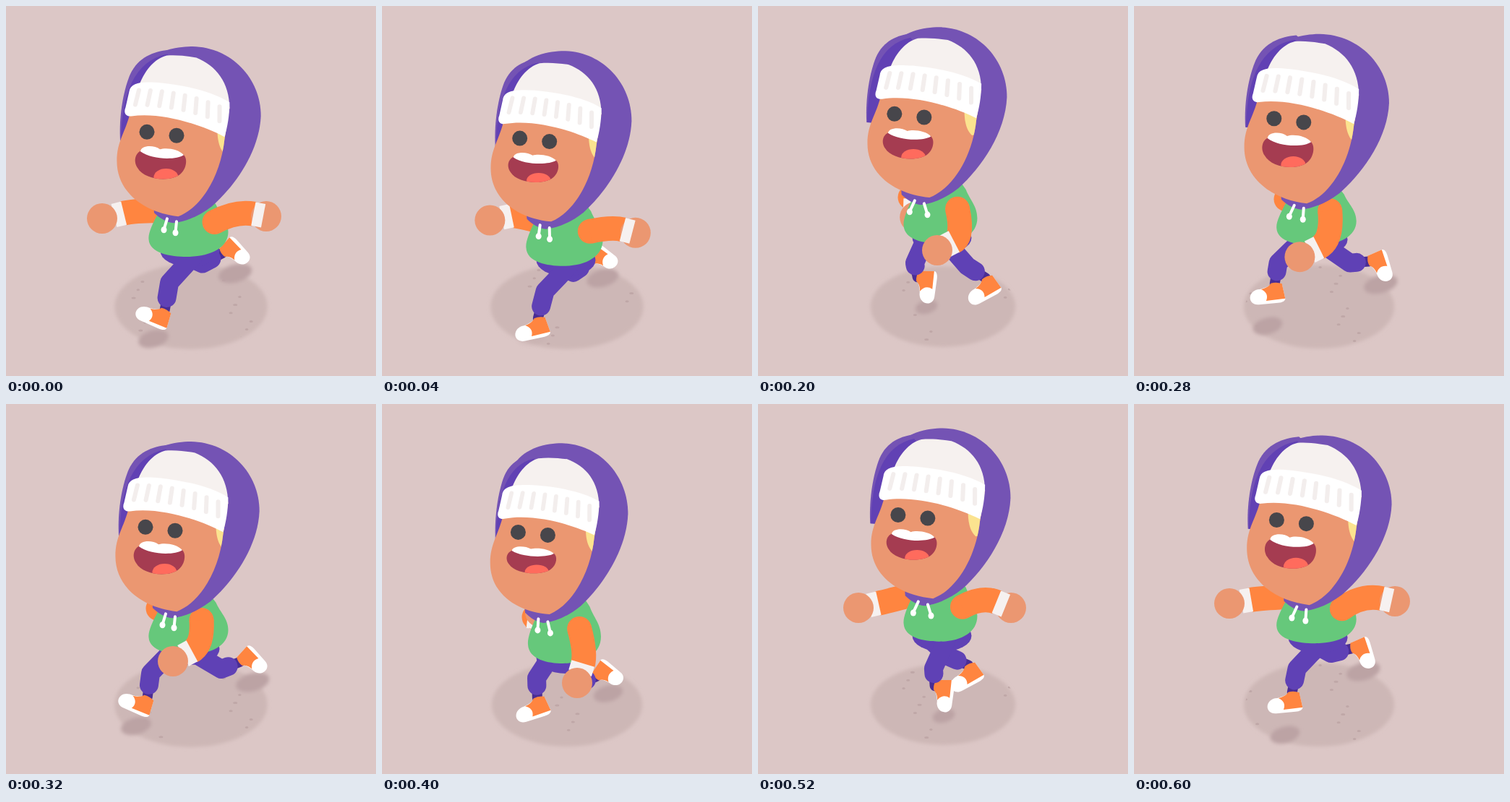
Animation, 512 px wide and 512 px high, one loop 640 ms. Source, as an HTML page:

```html
<!DOCTYPE html>
<html lang="en">
<head>
<meta charset="utf-8">
<title>Running character</title>
<style>
html, body { margin: 0; width: 100%; height: 100%; overflow: hidden; background: #dcc7c6; }
svg { display: block; width: 100%; height: 100%; }
</style>
</head>
<body>
<svg id="stage" viewBox="0 0 512 512"></svg>
<script>
const LOOP = 640, STEP = 40, HALF = LOOP / 2;
const C = {
  ground: '#cdb7b6', speck: '#bfa7a7', shade: '#bca3a4', hood: '#7453b4', inner: '#6141b4',
  pants: '#5f41b5', ankle: '#4a2d93', skin: '#eb9771', shirt: '#66c87b', sleeve: '#ff8540',
  cuff: '#f6f1f0', cap: '#f6f1ef', rib: '#f3eeed', hair: '#fbe38f', eye: '#47464b',
  mouth: '#a53c51', tongue: '#ff6b5d'
};

// Key points of a stride: time, x, y (and angle for the foot)
const FOOT = [
  [0, 204, 429, 24], [40, 208, 448, -12], [200, 312, 394, -28], [300, 343, 356, -122],
  [400, 313, 374, -140], [520, 257, 403, -82], [600, 209, 414, -5]];
const NEAR_HAND = [
  [0, 360, 291], [120, 322, 353], [200, 248, 338], [320, 231, 356], [400, 270, 386], [520, 350, 282], [600, 361, 273]];
const FAR_HAND = [
  [0, 133, 294], [120, 186, 295], [260, 232, 290], [400, 219, 288], [520, 139, 282], [600, 132, 276]];

const mod = (a, n) => ((a % n) + n) % n;
const clamp = a => Math.min(1, Math.max(0, a));
const turns = (t, period) => t / period * 2 * Math.PI;
const wave = (a, mean, cos, sin, sin2 = 0) =>
  mean + cos * Math.cos(a) + sin * Math.sin(a) + sin2 * Math.sin(2 * a);

// Smooth periodic curve through key points
function follow(keys, time) {
  const t = mod(time, LOOP), n = keys.length;
  const key = k => keys[mod(k, n)];
  const when = k => key(k)[0] + LOOP * Math.floor(k / n);
  let i = n - 1;
  while (key(i)[0] > t) i--;
  const span = when(i + 1) - when(i), u = (t - when(i)) / span;
  const slope = (k, c) => (key(k + 1)[c] - key(k - 1)[c]) / (when(k + 1) - when(k - 1)) * span;
  return key(i).slice(1).map((p, j) => {
    const c = j + 1, q = key(i + 1)[c], a = slope(i, c), b = slope(i + 1, c);
    return p + u * (a + u * (3 * (q - p) - 2 * a - b + u * (2 * (p - q) + a + b)));
  });
}

const fill = (d, color, more = '') => `<path d="${d}" fill="${color}" ${more}/>`;
const line = (d, color, width, cap = 'round') =>
  `<path d="${d}" fill="none" stroke="${color}" stroke-width="${width}" stroke-linecap="${cap}" stroke-linejoin="round"/>`;
const oval = (x, y, rx, ry, color, more = '') =>
  `<ellipse cx="${x}" cy="${y}" rx="${rx}" ry="${ry}" fill="${color}" ${more}/>`;
const group = (transform, body) => `<g transform="${transform}">${body}</g>`;

function ground(t) {
  const size = wave(turns(t - 20, HALF), 103, 3, 0);
  let specks = '';
  for (let i = 1; i <= 25; i++) {
    const u = mod(i * .618 + t / HALF, 1) - .5, v = mod(i * .755 + .1, 1) - .5;
    specks += oval(256 + 224 * u + 160 * v, 416 - 128 * u + 100 * v, 2.2 + i % 3 * .4, 1.5, C.speck);
  }
  return oval(256, 416, size, size * .555, C.ground, 'filter="url(#soft)"') +
    `<g clip-path="url(#disc)">${specks}</g>`;
}

// The shadow stays on the ground track and fades in as the foot lifts.
function footShade(t) {
  const [x, footY] = follow(FOOT, t);
  const y = 460 - .55 * (x - 205), r = 15 + Math.abs(x - 262) * .11;
  return oval(x, y, r, r * .35 + 4, C.shade,
    `opacity="${clamp((y - footY - 8) / 15)}" transform="rotate(-15 ${x} ${y})" filter="url(#soft)"`);
}

function leg(t, hipX, hipY) {
  const stride = turns(t, LOOP);
  const [x, y, angle] = follow(FOOT, t);
  const r = angle * Math.PI / 180, cos = Math.cos(r), sin = Math.sin(r);
  const ax = x + 11 * cos + 14 * sin, ay = y + 11 * sin - 14 * cos;
  const kx = (hipX + ax) / 2 + wave(stride, -4, -10, 2);
  const ky = (hipY + ay) / 2 + wave(stride, 8, -8, -3);
  const shin = Math.hypot(ax - kx, ay - ky) || 1, keep = Math.max(.2, 1 - 17 / shin);
  const cx = kx + (ax - kx) * keep, cy = ky + (ay - ky) * keep;
  const shoe =
    fill('M22 -14L25 9C25 13 20 15 14 15L-14 15C-30 15 -30 -6 -14 -9C-4 -9 4 -14 8 -16Z', '#fff') +
    fill('M-9 -9C0 -10 4 -14 6 -17Q14 -19 22 -15L25 9L-3 10C1 2 -2 -5 -9 -9Z', C.sleeve);
  return line(`M${cx} ${cy}L${ax} ${ay}`, C.ankle, 14) +
    group(`translate(${x} ${y}) rotate(${angle}) scale(${.88 + .07 * cos} .87)`, shoe) +
    line(`M${hipX} ${hipY}L${kx} ${ky}L${cx} ${cy}`, C.pants, 26);
}

function arm([sx, sy], [bendX, bendY], [hx, hy], gap, cuffOnTop) {
  const ex = (sx + hx) / 2 + bendX, ey = (sy + hy) / 2 + bendY;
  const reach = Math.hypot(hx - ex, hy - ey) || 1;
  const along = d => `${hx + (hx - ex) / reach * (d - gap)} ${hy + (hy - ey) / reach * (d - gap)}`;
  const hand = oval(hx, hy, 21, 21, C.skin);
  const cuff = line(`M${along(-7)}L${along(7)}`, C.cuff, 33, 'butt');
  return oval(sx, sy, 17, 17, C.sleeve) + line(`M${sx} ${sy}Q${ex} ${ey} ${along(-6)}`, C.sleeve, 34, 'butt') +
    (cuffOnTop ? hand + cuff : cuff + hand);
}

function torso(x, bottom, width, turn) {
  return group(`translate(${x} ${bottom}) scale(${width / 110} ${1 + .1 * turn})`,
    fill('M-42 -60C-50 -45 -56 -32 -55 -24C-54 -5 -25 0 -2 0C30 0 55 -12 55 -34C55 -50 44 -58 38 -72L20 -95L-30 -90Z', C.shirt));
}

// Drawn around the left eye; turn narrows the hood, peek slides the face within it.
function head(x, y, turn, peek) {
  const part = (a, b, d, e, f, body) => group(`matrix(${a} ${b} 0 ${d} ${e} ${f}) translate(-195 -174)`, body);
  const face = 'M172 145C165 175 153 186 153 214C153 258 192 286 238 291C272 278 297 232 302 184L309 140Z';
  const mouth = 'M190 199C178 202 176 215 182 224C192 242 230 244 242 232C250 225 252 210 245 205Z';
  const clip = (id, d) => `<clipPath id="${id}"><path d="${d}"/></clipPath>`;
  let ribs = '';
  for (let i = 0; i < 8; i++) {
    const rx = 181 + 16.3 * i, ry = 126 + .47 * i * i, lean = 2.5 - i * .35;
    ribs += line(`M${rx + lean} ${ry - 10}L${rx - lean} ${ry + 10}`, C.rib, 6);
  }
  return group(`translate(${x} ${y})`,
    part(1 - .04 * turn, 0, 1 + .02 * turn, 0, -3 * turn, fill(
      'M190 84C205 62 236 56 258 56C312 57 353 100 353 152C351 200 318 248 285 277C268 290 250 298 232 300C222 299 212 293 205 286Z', C.hood)) +
    part(1 - .2 * turn, 0, 1 - .06 * turn, -1.6 * turn - 4 * peek, 0,
      fill('M158 186C156 150 163 115 172 94C183 70 205 62 226 60L260 90L200 190Z', C.hood) +
      fill('M159 186C160 120 178 75 224 66L245 95L190 186Z', C.inner)) +
    part(1 - .035 * turn + .025 * peek, -.045 * turn, 1 - .03 * turn, 2 * turn + 4.5 * peek, 2 * turn,
      clip('face', face) + fill(face, C.skin) +
      `<g clip-path="url(#face)">${group(`translate(${-3 * turn - 6 * peek} 0)`,
        fill('M293 160C291 188 297 199 303 205L325 200L325 160Z', C.hair))}</g>` +
      fill('M183 112C190 90 205 72 222 68C238 67 250 69 263 71C290 82 309 105 309 142Z', C.cap) +
      fill('M170 118C172 104 190 104 215 106C250 110 285 118 309 133C309 150 306 168 302 181C270 164 215 146 173 152C165 153 162 147 165 140Z', '#fff') +
      ribs) +
    oval(0, 0, 10.5, 10.5, C.eye) + oval(41, 5 - turn, 10.5, 10.5, C.eye) +
    part(1 - .03 * turn, 0, 1 - .2 * turn, 0, 4 * turn,
      clip('mouth', mouth) + fill(mouth, C.mouth) +
      oval(221.5, 237, 17, 12, C.tongue, 'clip-path="url(#mouth)"') +
      fill('M186 201C187 192 205 192 213 198C222 195 240 198 246 206C236 213 202 213 186 201Z', '#fff')));
}

function strings(x, y, bob) {
  const cord = (cx, cy, swing) =>
    line(`M${cx} ${cy}L${cx + swing} ${cy + 15}`, '#fff', 4) + oval(cx + swing, cy + 15.5, 4, 4.5, '#fff');
  return cord(x + 28, y + 120, wave(bob, -4.5, 0, 3.5)) + cord(x + 41, y + 124, wave(bob, 2.5, -4, 1));
}

const DEFS = `<defs>
  <filter id="soft" x="-20%" y="-20%" width="140%" height="140%"><feGaussianBlur stdDeviation="2.5"/></filter>
  <clipPath id="disc"><ellipse cx="256" cy="416" rx="102" ry="57"/></clipPath></defs>`;
const FAR = 'translate(-24 -15)';

function scene(t) {
  const bob = turns(t, HALF), stride = turns(t, LOOP);
  const eyeX = wave(bob, 191, 3, -3.5) + wave(stride, 0, 1, -2.3);
  const eyeY = wave(bob, 164.3, 8, 13.5, 2.3) + wave(stride, 0, 2, -1.4);
  const turn = wave(bob, .45, -.4, .5);
  const peek = wave(turns(t - 215, HALF), .5, .5, 0) ** 2;
  const x = 252.5, bottom = wave(bob, 342, 5, 17, 2.3);
  const nearArm = arm([x + wave(stride, 27, 9, 0), bottom - 48], [wave(stride, 8, -14, 10), wave(stride, -3, -9, 10)],
    follow(NEAR_HAND, t), wave(stride, 17, -6, 0), Math.cos(stride) > -.01);
  const farArm = arm([x - 42, bottom - 64], [4, wave(stride, -5, 0, -5)],
    follow(FAR_HAND, t), wave(stride, 20, 4, 0), false);
  return DEFS + '<rect width="512" height="512" fill="#dcc7c6"/>' + ground(t) +
    group(FAR, footShade(t + HALF)) + footShade(t) +
    group(FAR, leg(t + HALF, x + 4, bottom + 7)) +
    oval(x + 2, bottom - 8, 41, 22, C.pants) +
    leg(t, x + 8, bottom - 2) + farArm +
    torso(x, bottom, wave(bob, 104, 6, -3), turn) + nearArm +
    head(eyeX, eyeY, turn, peek) + strings(eyeX, eyeY, bob);
}

const stage = document.getElementById('stage');
const start = performance.now();
let shown = -1;

function tick() {
  const t = Math.floor(mod(performance.now() - start, LOOP) / STEP) * STEP;
  if (t !== shown) stage.innerHTML = scene(shown = t);
  requestAnimationFrame(tick);
}
tick();
</script>
</body>
</html>
```
